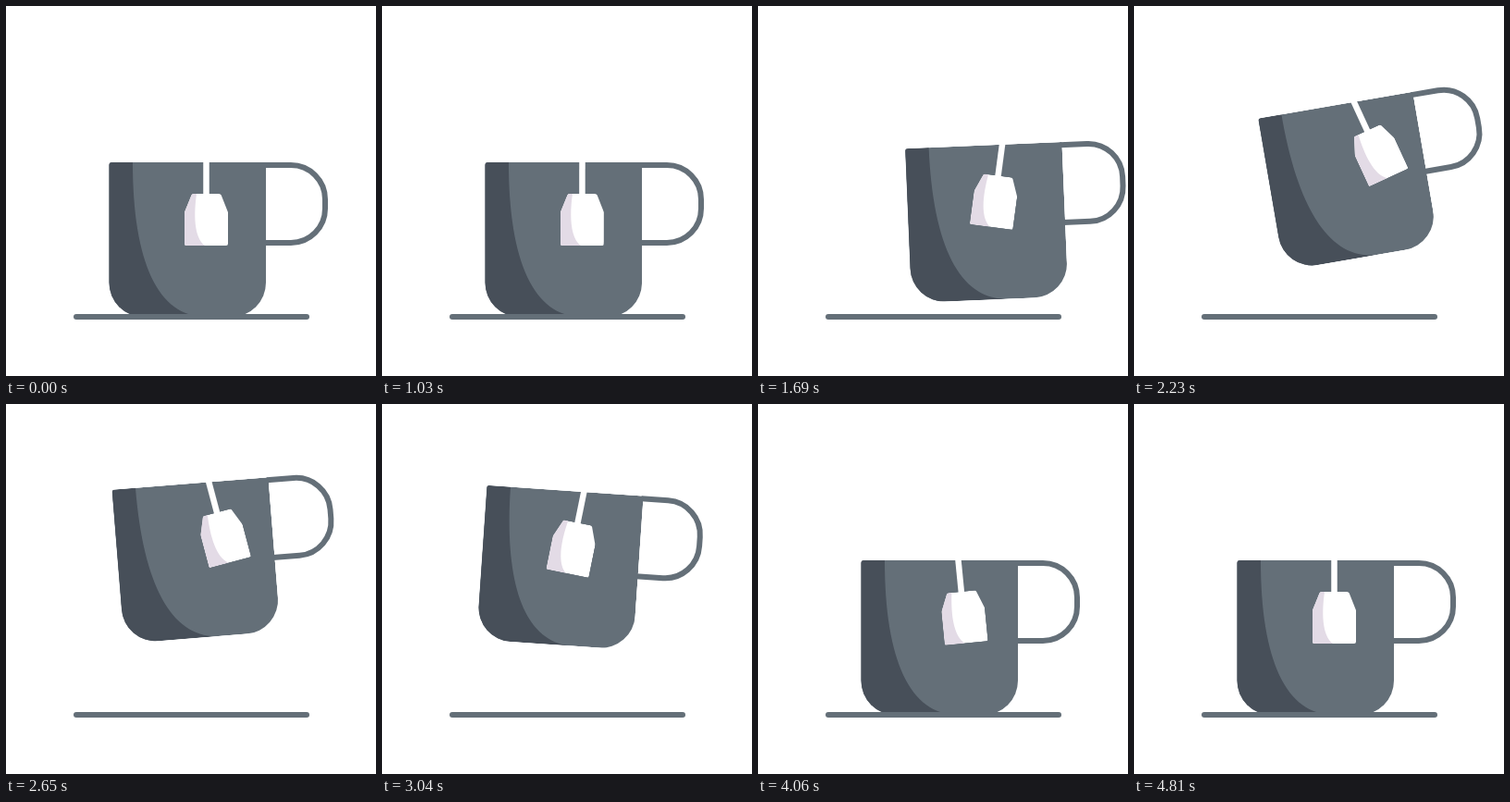
Animation of 400 by 400 pixels, one loop 4840 ms. Source, as an HTML page:

```html
<!DOCTYPE html>
<html lang="en">
<head>
<meta charset="utf-8">
<title>Tea cup</title>
<style>
  html, body { margin: 0; height: 100%; overflow: hidden; background: #fff; }
  svg { display: block; width: 100%; height: 100%; }
</style>
</head>
<body>
<svg viewBox="0 0 400 400">
  <defs>
    <clipPath id="body">
      <path d="M114.500 169H281V299A37 37 0 0 1 244 336H148.500A37 37 0 0 1 111.500 299V172Q111.500 169 114.500 169Z"/>
    </clipPath>
    <clipPath id="bag">
      <path d="M203 203H230Q232 203 232.700 204.500L240 223V257Q240 259 238 259H195Q193 259 193 257V223L200.500 204.500Q201 203 203 203Z"/>
    </clipPath>
  </defs>
  <g id="cup">
    <path d="M279 172H308A37 37 0 0 1 345 209V219A37 37 0 0 1 308 256H279" fill="none" stroke="#646f78" stroke-width="6"/>
    <g clip-path="url(#body)">
      <path d="M111 169H281V336H111Z" fill="#646f78"/>
      <path d="M111 169H137C137 278 165 336 216 336H111Z" fill="#474f59"/>
    </g>
    <g id="tag">
      <path d="M216.500 167V205" stroke="#fff" stroke-width="6.500"/>
      <g clip-path="url(#bag)">
        <path d="M193 203H240V259H193Z" fill="#fff"/>
        <path d="M193 203H206C203 225 203 250 215 259H193Z" fill="#e3dbe6"/>
      </g>
    </g>
  </g>
  <path d="M76 336H325" stroke="#646f78" stroke-width="6" stroke-linecap="round"/>
</svg>
<script>
  const LOOP = 4840;
  const cup = document.getElementById('cup');
  const tag = document.getElementById('tag');
  const start = performance.now();

  function draw() {
    const time = (performance.now() - start) % LOOP;

    // Smooth change by `amount` between two times in ms.
    const move = (amount, from, to) => {
      const u = Math.min(1, Math.max(0, (time - from) / (to - from)));
      return amount * u * u * (3 - 2 * u);
    };

    const x = move(52, 1030, 1750) + move(-56, 1750, 3070) + move(4, 3520, 3790);
    const y = move(-86, 1270, 2620) + move(86, 2800, 3790);
    const tilt = move(-2.4, 1000, 1640) + move(-7.4, 1690, 2260)
      + move(16.1, 2260, 3290) + move(-6.3, 3420, 3950);
    const swing = move(10, 1000, 1690) + move(-25, 1690, 2230)
      + move(39, 2400, 3560) + move(-30, 3560, 3980) + move(6, 3980, 4500);

    cup.setAttribute('transform', `translate(${x} ${y}) rotate(${tilt} 230 252)`);
    tag.setAttribute('transform', `rotate(${swing} 216.5 169)`);
    requestAnimationFrame(draw);
  }
  draw();
</script>
</body>
</html>
```
